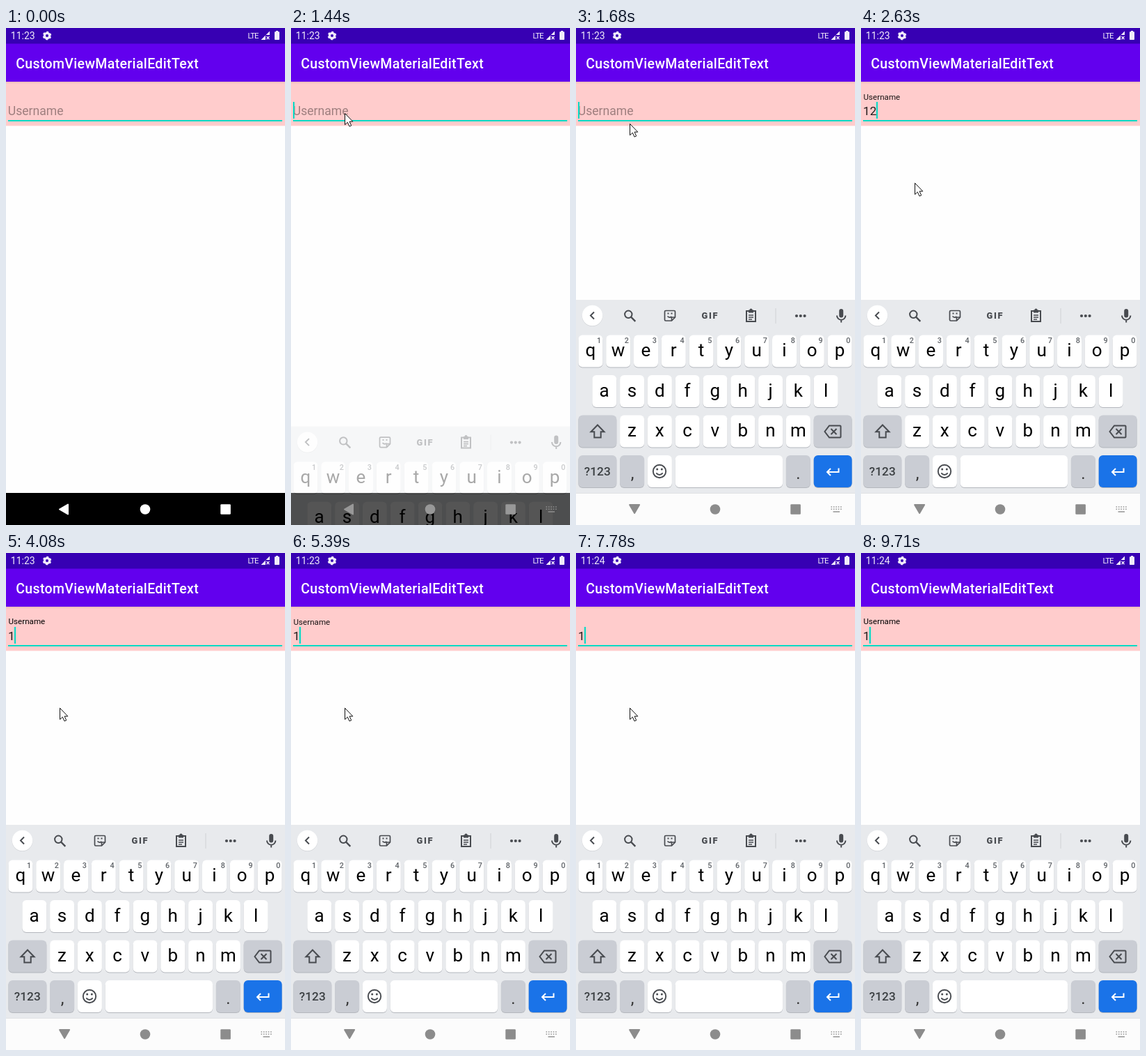
Animation of 401x713 px, one loop 9830 ms. Source, as an HTML page:

```html
<!DOCTYPE html>
<html lang="en">
<head>
<meta charset="utf-8">
<title>Floating label demo</title>
<style>
  html, body { margin: 0; width: 100%; height: 100%; overflow: hidden; background: #fff; }
  svg { display: block; width: 100vw; height: 100vh; }
  text { font-family: Roboto, sans-serif; white-space: pre; }
  .mid { text-anchor: middle; }
  .line { fill: none; stroke: #484b50; stroke-width: 2; }
  .solid { fill: #484b50; }
</style>
</head>
<body>
<svg viewBox="0 0 401 713">
  <defs>
    <linearGradient id="shade" x2="0" y2="1">
      <stop offset="0" stop-opacity=".1"/>
      <stop offset="1" stop-opacity="0"/>
    </linearGradient>
  </defs>
  <rect width="401" height="713" fill="#fefefe"/>

  <!-- field -->
  <rect y="77" width="401" height="63.4" fill="#fcc"/>
  <rect y="77" width="401" height="3" fill="url(#shade)"/>
  <rect x="3" y="132" width="394" height="2" fill="#03dac5"/>
  <text id="label" x="3.6" font-size="11.6">Username</text>
  <text id="hint" x="2.8" y="125" font-size="17.6" fill-opacity=".38">Username</text>
  <text id="value" x="3" y="125" font-size="17.2" fill="#221c1c"></text>
  <rect id="caret" y="106" width="2" height="24" fill="#03dac5"/>

  <!-- status and title bars -->
  <rect y="22" width="401" height="55" fill="#6200ee"/>
  <rect width="401" height="22.5" fill="#3700b3"/>
  <g fill="#f1ecfa">
    <text id="clock" x="6.8" y="16" font-size="14">11:23</text>
    <g fill="none" stroke="#f1ecfa" transform="translate(59 11)">
      <circle r="3.6" stroke-width="3.2"/>
      <circle r="5.3" stroke-width="2" stroke-dasharray="2.9 2.65" transform="rotate(15)"/>
    </g>
    <text x="347.5" y="15" font-size="11.3" letter-spacing="-.9">LTE</text>
    <path d="M366.5 17L379 4.5V10H373V17Z"/>
    <path d="M374.5 12l4 4.2m0-4.2l-4 4.2" stroke="#f1ecfa" stroke-width="1.3"/>
    <path d="M388 4h3v1.3h1.2q.8 0 .8.8v10q0 .9-.8.9h-5.4q-.8 0-.8-.9v-10q0-.8.8-.8h1.2z"/>
  </g>
  <text x="14.2" y="58" font-size="19.5" font-weight="500" letter-spacing=".36" fill="#fff">CustomViewMaterialEditText</text>

  <rect y="667" width="401" height="46" fill="#000"/>

  <g id="board">
    <rect y="390" width="401" height="278" fill="#e8eaed"/>
    <rect y="667" width="401" height="240" fill="#fcfcfc"/>
    <rect y="667" width="401" height="1" fill="#e2e3e5"/>
    <g id="keys"></g>
    <!-- suggestion strip -->
    <circle cx="23.5" cy="413.2" r="14.8" fill="#cfd1d5"/>
    <circle cx="23.5" cy="412.5" r="14.7" fill="#fff"/>
    <g class="line">
      <path d="M26 407.5l-5 5 5 5"/>
      <circle cx="75.3" cy="410.8" r="5.2"/>
      <path d="M79 414.5l6.3 6.3" stroke-width="2.4"/>
      <path d="M129 405.5h12q1.5 0 1.5 1.5v8l-5 5h-8.5q-1.5 0-1.5-1.5v-11.5q0-1.5 1.5-1.5zM142 415h-4.5v5M131.5 413.5q3 3 6 .5" stroke-width="1.7"/>
      <path d="M131.5 409.5h2m3 0h2"/>
      <path d="M245 406h13v15h-13z"/>
      <path d="M248 412h7m-7 3h7m-7 3h5" stroke-width="1.6"/>
      <path d="M248 406.5h7" stroke-width="4"/>
      <path d="M375 412.5a6.2 6.2 0 0 0 12.4 0M381.2 418.5v4"/>
    </g>
    <g class="solid">
      <circle cx="251.5" cy="404.5" r="2"/>
      <rect x="378.2" y="403" width="6" height="12.5" rx="3"/>
      <text x="180.5" y="417" font-size="12.8" font-weight="900" letter-spacing="1.7">GIF</text>
      <circle cx="317" cy="413" r="2.1"/><circle cx="322.8" cy="413" r="2.1"/><circle cx="328.6" cy="413" r="2.1"/>
      <circle cx="116.7" cy="633" r="1.5"/><circle cx="123.3" cy="633" r="1.5"/>
    </g>
    <rect x="286.5" y="402" width="1" height="22" fill="#cfd1d5"/>
    <!-- key icons -->
    <g class="line">
      <path d="M31 569.5l9.5 9.8h-4.8v8.2h-9.4v-8.2h-4.8z"/>
      <path d="M364 570.5h15.5q1 0 1 1v15q0 1-1 1H364l-6.5-8.5zM366.5 575l8 8m0-8l-8 8"/>
      <circle cx="120" cy="636" r="9.2" stroke-width="1.9"/>
      <path d="M115.3 638.3q4.7 5.4 9.4 0" stroke-width="1.9"/>
      <path d="M377.5 631.5v5.5h-16M366 632l-5 5 5 5" stroke="#fff"/>
    </g>
  </g>

  <g id="nav">
    <path id="back" d="M77 690.5L89 683.5V697.5Z" stroke-width="2" stroke-linejoin="round"/>
    <circle cx="200" cy="690.5" r="7.3"/>
    <rect x="308.3" y="683.2" width="14.6" height="14.6" rx="1.4"/>
  </g>
  <g id="ime" fill="none" stroke="#959595" stroke-width="1.5">
    <path d="M366.5 687h15.5m-15.5 3.2h15.5" stroke-dasharray="1.6 1.8"/>
    <path d="M369.5 694h9.5"/>
  </g>

  <path id="pointer" d="M.5 .5V16.8L4.3 13.3L7 19.2L9.7 18L7.1 12.2H11.8Z" fill="#fff" stroke="#111" stroke-linejoin="round"/>
</svg>
<script>
const $ = id => document.getElementById(id);
const set = (id, name, v) => $(id).setAttribute(name, v);
const show = (id, on) => set(id, 'visibility', on ? 'visible' : 'hidden');

const LOOP = 9830, FRAME = 120, BLINK = 480;

// Keyboard: keys sit on a grid of columns and rows
const GREY = '#cacdd4';
const colX = c => 3.4 + 39.8 * c;
const rowY = r => 440.6 + 57.5 * r;
const rect = (x, y, w, fill) =>
  `<rect x="${x}" y="${y}" width="${w}" height="46" rx="6" fill="${fill}"/>`;
const glyph = (s, x, y, size, fill = '#000', weight = 400) =>
  `<text class="mid" x="${x}" y="${y}" font-size="${size}" fill="${fill}" font-weight="${weight}">${s}</text>`;
function key(col, row, span = 1, fill = '#fff') {
  const x = colX(col), y = rowY(row), w = 39.8 * span - 4.8;
  return rect(x, y + 1, w, '#b4b7bd') + rect(x, y, w, fill);
}

let keys = '';
['qwertyuiop', 'asdfghjkl', 'zxcvbnm'].forEach((letters, r) => {
  const first = (10 - letters.length) / 2;
  [...letters].forEach((c, i) => {
    const x = colX(first + i) + 17.4;
    keys += key(first + i, r) + glyph(c, x, rowY(r) + 30.5, 26);
    if (!r) keys += glyph((i + 1) % 10, x + 12.3, 452, 10.8, '#5f6368', 500);
  });
});
for (const r of [2, 3]) keys += key(0, r, 1.5, GREY) + key(8.5, r, 1.5, r > 2 ? '#1a73e8' : GREY);
keys += key(1.5, 3, 1, GREY) + key(2.5, 3) + key(3.5, 3, 4) + key(7.5, 3, 1, GREY)
  + glyph('?123', 30.8, 642, 17.3, '#3c4043', 500)
  + glyph(',', 81, 647, 24, '#333') + glyph('.', 319.5, 647, 24, '#333');
$('keys').innerHTML = keys;

// Edits: time and number of digits left in the field
const edits = [[1080, 0], [1440, 0], [2390, 1], [2630, 2], [3000, 3], [3840, 2], [4080, 1],
  [4450, 0], [5150, 1], [5840, 0], [6450, 1], [7180, 0], [7780, 1]];
const flips = edits.filter(([, n], i) => i && !n !== !edits[i - 1][1]);

// Pointer moves: start, duration, dx, dy
const moves = [[370, 710, -221, -556], [1560, 480, 0, 100], [8770, 820, 285, 472]];

const clamp = v => Math.min(1, Math.max(0, v));
const ease = v => .5 - Math.cos(Math.PI * clamp(v)) / 2;
const latest = (rows, t) => rows.filter(r => r[0] <= t).pop();
// Eased progress that advances in whole frames
const stepped = (t, start, length) => ease(Math.floor((t - start) / FRAME + .05) * FRAME / length);

function drawField(t) {
  const [since, count] = latest(edits, t) || [Infinity, 0];
  $('value').textContent = '123'.slice(0, count);
  show('hint', !count);
  set('caret', 'x', Math.floor(3.2 + 9.5 * count));
  show('caret', t >= since && Math.floor((t - since) / BLINK) % 2 === 0);

  const [start, filled] = latest(flips, t) || [0, 0];
  const p = start ? stepped(t, start, 300) : 1;
  const shown = filled ? p : 1 - p;
  set('label', 'y', 102 + 15.6 * (1 - shown));
  set('label', 'fill-opacity', shown);
}

function drawKeyboard(t) {
  const p = clamp(Math.floor((t - 1320) / FRAME) / 3);
  set('board', 'transform', `translate(0 ${323 * (1 - p) ** 1.42})`);
  set('board', 'opacity', p);
  const dim = clamp(p * 2.7), tone = Math.round(255 - 115 * dim);
  set('nav', 'fill', `rgb(${tone},${tone},${tone})`);
  set('back', 'stroke', `rgb(${tone},${tone},${tone})`);
  set('back', 'transform', `rotate(${-90 * stepped(t, 1440, 240)} 83.3 689.7)`);
  set('ime', 'opacity', dim);
}

function drawPointer(t) {
  let x = 298, y = 678;
  for (const [start, length, dx, dy] of moves) {
    const p = stepped(t, start, length);
    x += dx * p;
    y += dy * p;
  }
  set('pointer', 'transform', `translate(${Math.round(x)} ${Math.round(y)})`);
  show('pointer', t >= 370 && t < 9700);
}

function draw(t) {
  $('clock').textContent = t < 5840 ? '11:23' : '11:24';
  drawField(t);
  drawKeyboard(t);
  drawPointer(t);
}

const begin = performance.now();
function loop() {
  draw((performance.now() - begin) % LOOP);
  requestAnimationFrame(loop);
}
loop();
</script>
</body>
</html>
```
